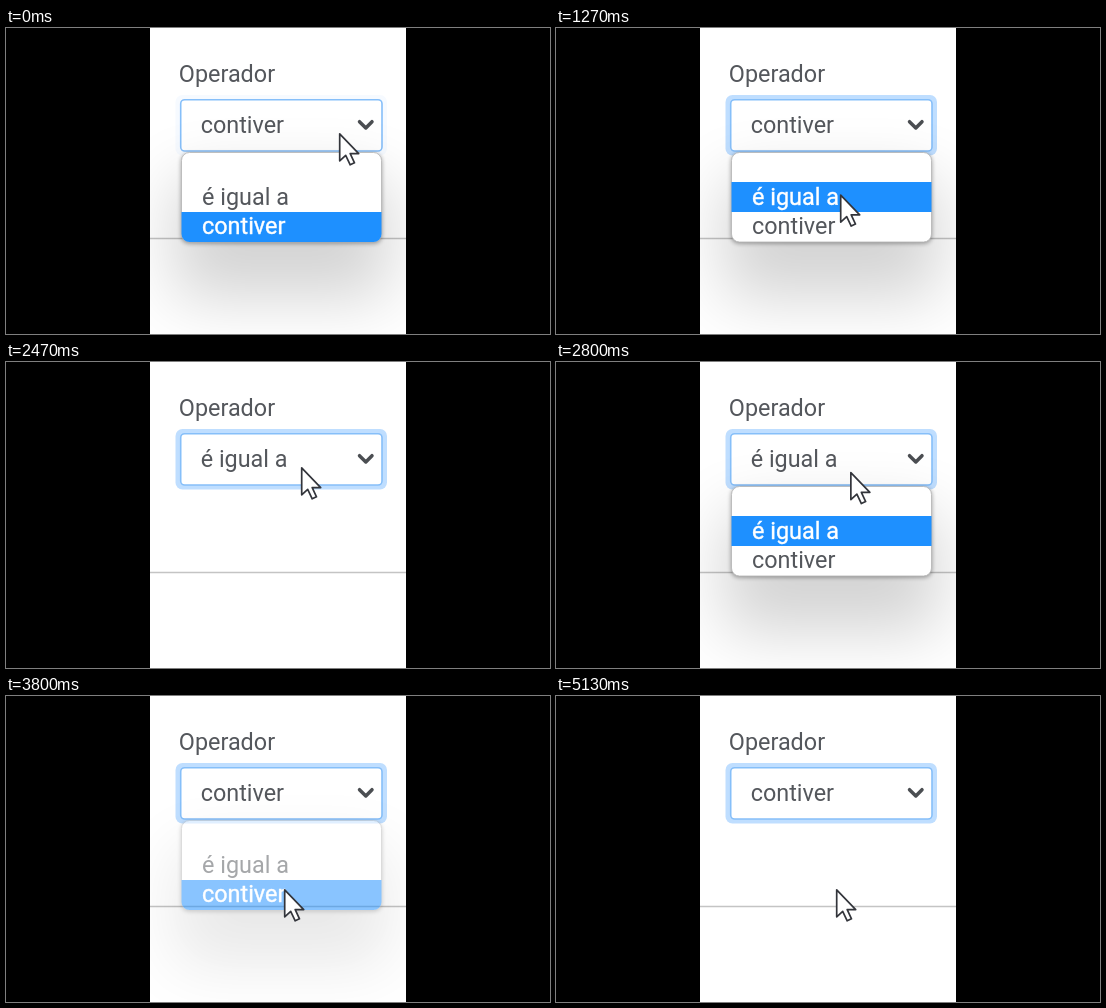
Write an HTML page that moves like this. It is 544 by 306 pixels and loops after 5190 ms.

```html
<!DOCTYPE html>
<html lang="pt">
<head>
<meta charset="utf-8">
<style>
  html, body { margin: 0; width: 100%; height: 100%; overflow: hidden; background: #000; }
  svg { display: block; width: 100%; height: 100%; }
  text { font: 23.4px Roboto, sans-serif; fill: #54575c; }
  .screen { filter: blur(.45px); }
</style>
</head>
<body>
<svg viewBox="0 0 544 306">
  <defs>
    <clipPath id="panel"><rect x="144" width="256" height="306"/></clipPath>
    <clipPath id="list"><rect x="175.5" y="124.5" width="200" height="89.5" rx="8"/></clipPath>
    <filter id="soft" x="-60%" y="-110%" width="220%" height="320%"><feGaussianBlur stdDeviation="32"/></filter>
    <filter id="tight" x="-10%" y="-20%" width="120%" height="140%"><feGaussianBlur stdDeviation="2"/></filter>
  </defs>
  <g clip-path="url(#panel)">
    <g class="screen">
      <rect x="134" y="-10" width="276" height="326" fill="#fff"/>
      <path d="M134 210.5H410" stroke="#c4c4c4" stroke-width="1.4"/>
      <text x="172.8" y="53.5">Operador</text>

      <rect id="ring" x="169.5" y="67" width="211.5" height="60.5" rx="7" fill="#bfdeff"/>
      <rect x="174.7" y="71.7" width="201.3" height="51.3" rx="4" fill="#fff" stroke="#86bff9" stroke-width="1.6"/>
      <text id="value" x="194.7" y="105"></text>
      <path d="M353.5 93.7L359.8 100L366 93.7" fill="none" stroke="#4b4e52" stroke-width="3.5" stroke-linecap="round" stroke-linejoin="round"/>

      <g id="menu">
        <rect x="168" y="150" width="215" height="120" opacity=".17" filter="url(#soft)"/>
        <rect x="175" y="125.5" width="201" height="90" rx="8" opacity=".35" filter="url(#tight)"/>
        <rect x="175.5" y="124.5" width="200" height="89.5" rx="8" fill="#fff" stroke="#b4b4b4" stroke-width=".8"/>
        <rect id="highlight" x="175" width="201" height="30" fill="#1e90ff" clip-path="url(#list)"/>
        <text class="option" x="196" y="176.5">é igual a</text>
        <text class="option" x="196" y="206.2">contiver</text>
      </g>

      <path id="cursor" d="M.7 .8V27.8L6.7 22.3L11.2 31.8L15.5 29.8L11.2 20.6H19.7Z" fill="#fff" stroke="#33353b" stroke-width="1.7" stroke-linejoin="round"/>
    </g>
  </g>
</svg>
<script>
  const LOOP = 5190, STEP = 1000 / 15;
  const EQUALS = 0, CONTAINS = 1;
  const labels = ['é igual a', 'contiver'];

  // time, x, y of the pointer tip
  const path = [
    [0, 333, 105], [67, 333, 105], [667, 320, 143], [933, 290, 165],
    [1067, 290, 165], [1600, 271, 169], [1933, 271, 169], [2467, 295, 105],
    [2733, 295, 105], [3200, 280, 190], [3333, 279, 192], [3533, 278, 193],
    [4067, 278, 193], [4200, 280, 193], [LOOP, 280, 193]
  ];

  const $ = id => document.getElementById(id);
  const options = document.querySelectorAll('.option');
  const clamp = v => Math.max(0, Math.min(1, v));
  const smooth = v => v * v * (3 - 2 * v);

  function pointerAt(t) {
    const i = Math.max(1, path.findIndex(p => p[0] >= t));
    const [t0, x0, y0] = path[i - 1], [t1, x1, y1] = path[i];
    const k = smooth(clamp((t - t0) / (t1 - t0)));
    return [x0 + (x1 - x0) * k, y0 + (y1 - y0) * k];
  }

  function menuOpacity(t) {
    const fade = end => clamp((end - t) / 130);
    if (t < 1800) return fade(1735);
    return t < 2590 ? 0 : fade(3868);
  }

  function render(now) {
    const t = Math.floor((now % LOOP + 4) / STEP) * STEP;
    const [x, y] = pointerAt(t);
    const hovered = t > 725 && t < 3125 ? EQUALS : CONTAINS;

    $('cursor').setAttribute('transform', `translate(${x} ${y})`);
    $('ring').setAttribute('opacity', 0.15 + 0.85 * clamp((t - 67) / 200));
    $('value').textContent = labels[t > 1660 && t < 3795 ? EQUALS : CONTAINS];
    $('menu').setAttribute('opacity', menuOpacity(t));
    $('highlight').setAttribute('y', hovered === EQUALS ? 154 : 184);
    options.forEach((option, i) => {
      option.style.fill = i === hovered ? '#fff' : '';
      option.style.stroke = i === hovered ? '#fff' : 'none';
      option.style.strokeWidth = 0.4;
    });
    requestAnimationFrame(() => render(performance.now() - start));
  }

  const start = performance.now();
  render(0);
</script>
</body>
</html>
```
